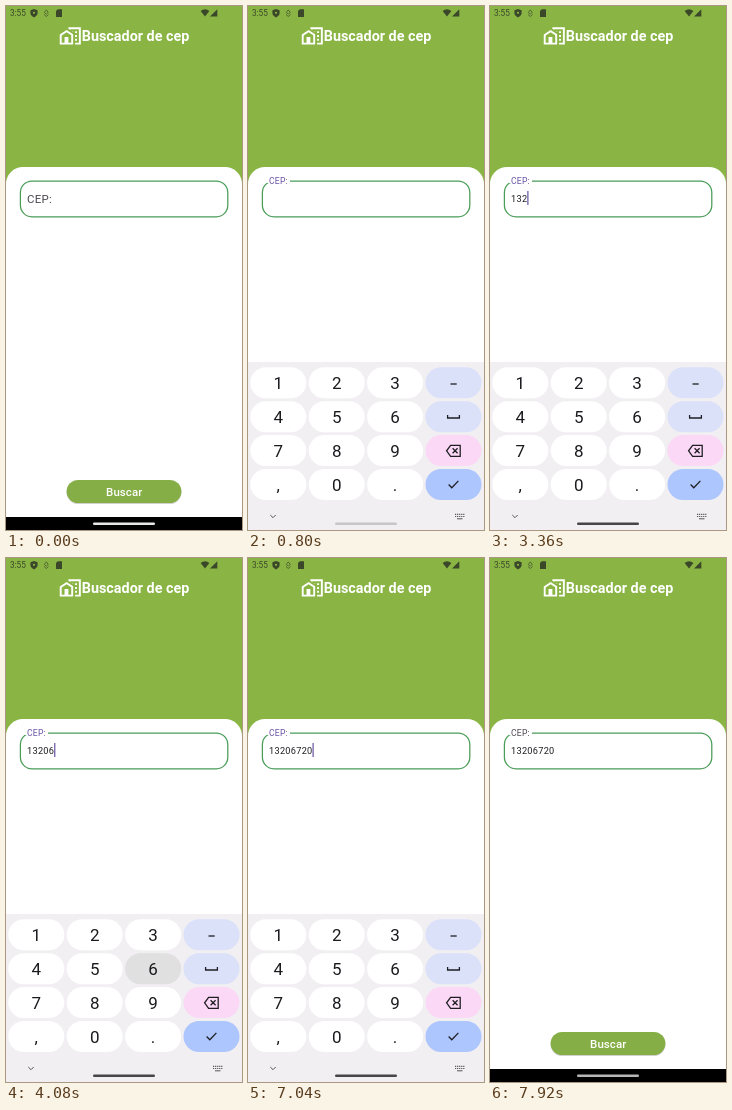
These frames come from a looping animation (236 px wide and 524 px high, 8 s). An HTML page:

```html
<!DOCTYPE html>
<html lang="pt-BR">
<head>
<meta charset="utf-8">
<title>Buscador de cep</title>
<style>
  html, body { margin: 0; width: 100%; height: 100%; overflow: hidden; background: #fff; }
  svg { display: block; width: 236px; height: 524px; font-family: Roboto, sans-serif; }
  .ink { fill: none; stroke: #1f1f23; stroke-width: 1.3; }
  .key text { font-size: 17px; text-anchor: middle; fill: #1b1b1f; }
</style>
</head>
<body>
<svg viewBox="0 0 236 524">
  <rect width="236" height="190" fill="#8ab545"/>

  <g fill="#3b4729">
    <text x="4" y="10.2" font-size="8.2">3:55</text>
    <path d="M28 3l3.6 1.3v2.8c0 2-1.5 3.5-3.6 4.3c-2.100-.8-3.600-2.300-3.600-4.300v-2.800z"/>
    <circle cx="28" cy="6.800" r="1.100" fill="#8ab545"/>
    <path d="M51.800 3.300h4.200v7.600h-6v-5.800z"/>
    <path d="M194.600 5.100q4.400-3.600 8.800 0l-4.400 5.500z"/>
    <path d="M211.300 3.300v7.300h-7.300z"/>
  </g>
  <path d="M38.300 6.500l2-2.600 2 2.600-2 1.600zM38 8.500l2.300 2 2.300-2" fill="none" stroke="#3b4729" stroke-width=".7"/>

  <g fill="#fff">
    <path transform="translate(52.800 18.500) scale(.957)" fill-rule="evenodd" d="M17 15h2v2h-2zM17 11h2v2h-2zM17 7h2v2h-2zM13.740 7l1.260.84V7zM10 3v1.510l2 1.330V5h9v14h-4v2h6V3zM8.170 5.700L15 10.250V21H1V10.480zM10 19h3v-7.840L8.170 8.090 3 11.380V19h3v-6h4v6z"/>
    <text x="75.800" y="34.900" font-size="14.350" font-weight="700">Buscador de cep</text>
    <path d="M0 524V178a17 17 0 0 1 17-17H219a17 17 0 0 1 17 17V524z"/>
  </g>

  <rect x="14.400" y="175" width="207.400" height="35.800" rx="11.500" fill="none" stroke="#4a9d58" stroke-width="1.250"/>
  <rect id="gap" x="19" y="173" height="4" fill="#fff"/>
  <text id="label" font-size="11.480" letter-spacing=".287">CEP:</text>
  <text id="value" x="21" y="196.300" font-size="9.180" letter-spacing=".287" fill="#1d1b20"></text>
  <rect id="cursor" y="185" width="1.150" height="14" fill="#5f4b9e"/>

  <rect x="60.600" y="475" width="114.800" height="23" rx="11.500" opacity=".18"/>
  <rect x="60.600" y="474" width="114.800" height="23" rx="11.500" fill="#86ae47"/>
  <text x="118.200" y="489.600" font-size="11.480" font-weight="500" letter-spacing=".06" text-anchor="middle" fill="#fff">Buscar</text>

  <rect y="511" width="236" height="13"/>
  <g id="board">
    <rect y="356" width="236" height="168" fill="#f1eff2"/>
    <g id="keys"></g>
    <path class="ink" d="M202.500 378h6.200"/>
    <path class="ink" d="M199.600 409v3h11.800v-3"/>
    <path class="ink" d="M202.600 439.300h9.600v11h-9.600l-4-5.500zM204.600 442.300l5 5m0-5l-5 5"/>
    <path class="ink" d="M200.600 478.500l3.200 3.200 6.600-6.800"/>
  </g>
  <g id="nav">
    <path d="M22.300 509l2.700 2.700 2.700-2.700" fill="none" stroke="#55555a"/>
    <path d="M207 508.300h9.500M207 510.500h9.500" stroke="#55555a" stroke-width="1.200" stroke-dasharray="1.200 .85"/>
    <path d="M209 512.800h5.500" stroke="#55555a"/>
  </g>
  <rect id="pill" x="87" y="516.600" width="62" height="2.400" rx="1.200"/>
</svg>

<script>
const LOOP = 8000, STEP = 80;
const CODE = '13206720';
const typed = [1840, 2320, 2960, 3600, 4080, 5600, 6160, 6720];
const taps = { 1: [1440], 3: [2080], 2: [2800, 5920], 0: [3440, 6480], 6: [4000], 7: [5360], ok: [7120] };
const names = ['1', '2', '3', 'dash', '4', '5', '6', 'space', '7', '8', '9', 'del', ',', '0', '.', 'ok'];
const tint = { dash: [219, 225, 249], space: [219, 225, 249], del: [251, 216, 246], ok: [174, 198, 254] };
const WHITE = [255, 255, 255], GREY = [74, 69, 80], PURPLE = [103, 80, 164];

const $ = id => document.getElementById(id);
const set = (el, attrs) => { for (const k in attrs) el.setAttribute(k, attrs[k]); return el; };
const add = (parent, tag, attrs) =>
  parent.appendChild(set(document.createElementNS('http://www.w3.org/2000/svg', tag), attrs));
const ramp = (t, a, b) => Math.min(1, Math.max(0, (t - a) / (b - a)));
const ease = x => 1 - (1 - x) ** 3;
const mix = (a, b, p) => a + (b - a) * p;
const rgb = (a, b, p) => `rgb(${a.map((v, i) => Math.round(mix(v, b[i], p)))})`;

const keys = names.map((name, i) => {
  const x = 2.3 + i % 4 * 58.4, y = 361.3 + Math.floor(i / 4) * 33.9;
  const g = add($('keys'), 'g', { class: 'key' });
  const cap = add(g, 'rect', { x, y, width: 56, height: 31, rx: 15.5 });
  if (name.length === 1) add(g, 'text', { x: x + 28, y: y + 21.7 }).textContent = name;
  return { cap, color: tint[name] || WHITE, taps: taps[name] || [] };
});

// Pressed keys darken at once, then fade back
const pressed = (key, t) => Math.max(0, ...key.taps.map(s => t < s ? 0 : 1 - ramp(t, s + 40, s + 240)));

function cursorOn(t, count) {
  if (t < 1120 || t >= 7200) return false;
  return !count || (t - typed[count - 1]) % 1000 <= 500;
}

function pillShade(t) {
  if (t < 1200) return mix(232, 198, ramp(t, 480, 800));
  if (t < 7200) return mix(198, 70, ramp(t, 1200, 1760));
  return mix(70, 182, ramp(t, 7360, 7920));
}

function draw(t) {
  const float = ease(ramp(t, 200, 420));
  const focus = ramp(t, 200, 420) - ramp(t, 7160, 7360);
  set($('label'), {
    transform: `translate(21 ${mix(197.1, 178, float)}) scale(${mix(1, .75, float)})`,
    fill: rgb(GREY, PURPLE, focus)
  });
  set($('gap'), { width: 23 * float });

  const count = typed.filter(s => t >= s).length;
  $('value').textContent = CODE.slice(0, count);
  set($('cursor'), { x: 21 + count * 5.44, opacity: cursorOn(t, count) ? 1 : 0 });

  const up = ease(ramp(t, 400, 760)) - ramp(t, 7160, 7480) ** 2;
  set($('board'), { transform: `translate(0 ${168 * (1 - up)})` });
  set($('nav'), { opacity: ramp(up, .5, 1) });
  for (const key of keys) set(key.cap, { fill: rgb(key.color, key.color.map(v => v * .85), pressed(key, t)) });

  const s = Math.round(pillShade(t));
  set($('pill'), { fill: `rgb(${s},${s},${s})` });
}

function tick() {
  draw(Math.floor(performance.now() % LOOP / STEP) * STEP);
  requestAnimationFrame(tick);
}
tick();
</script>
</body>
</html>
```
